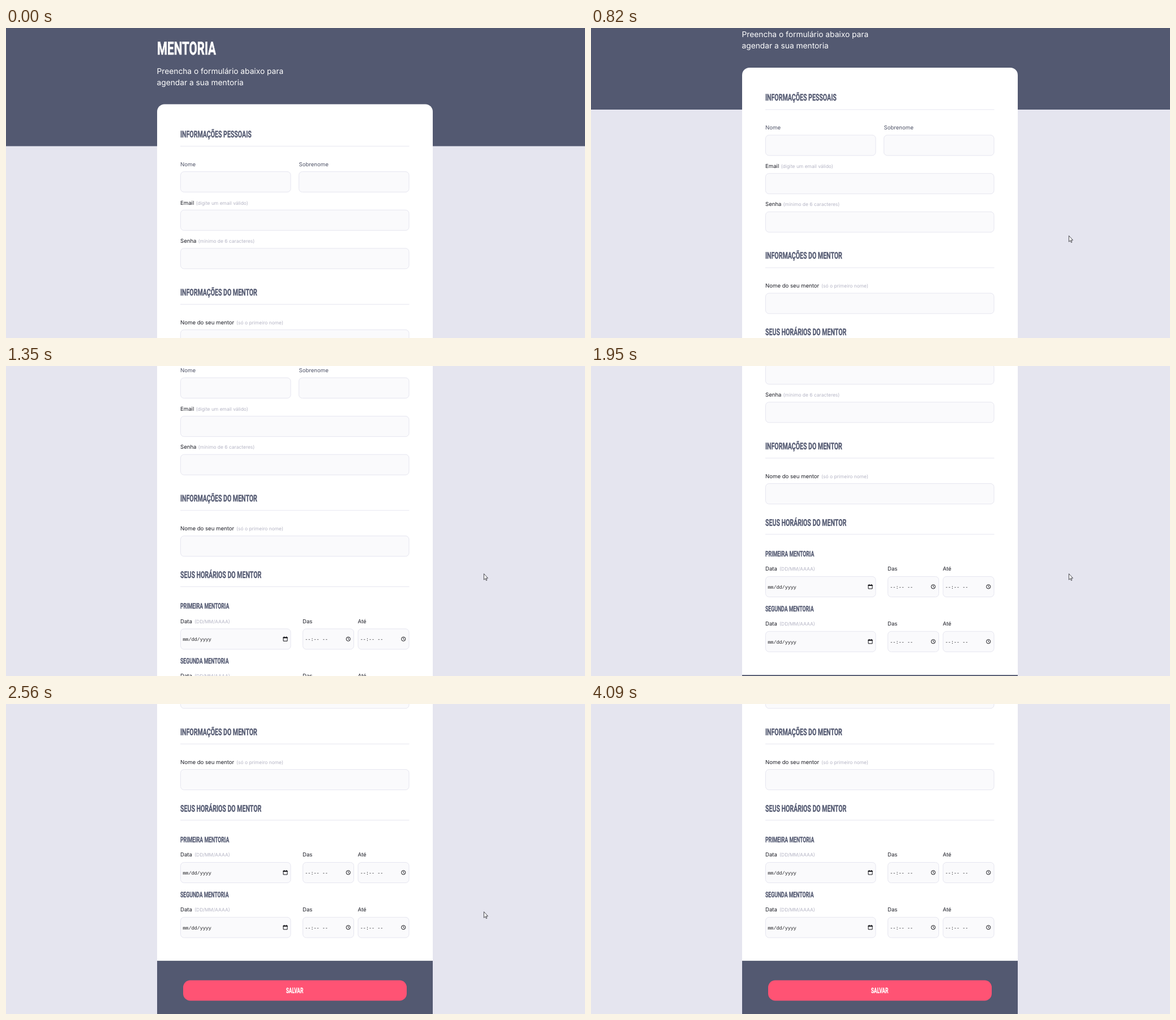
An HTML page for the animation above (4740 ms loop, 1023 by 547 pixels).

```html
<!DOCTYPE html>
<html lang="pt-BR">
<head>
<meta charset="utf-8">
<title>Mentoria</title>
<style>
  html, body { margin: 0; width: 100%; height: 100%; overflow: hidden; background: #e5e5ef; }
  svg { display: block; width: 100vw; height: 100vh; }
  text { font-family: Inter, "Open Sans", sans-serif; white-space: pre; text-rendering: geometricPrecision; }
  .head { font-family: Roboto, "Liberation Sans", sans-serif; font-weight: 700; }
  .mono { font-family: "Liberation Mono", "DejaVu Sans Mono", monospace; font-size: 8.45px; fill: #1b1b1f; }
  .label { font-size: 9.6px; fill: #1f2029; }
  .soft { fill: #4e5266; }
  .hint { font-size: 8.45px; fill: #b5b5c5; }
  .field { fill: #fafafc; stroke: #e6e6f0; stroke-width: 1; }
</style>
</head>
<body>
<svg id="stage" viewBox="0 0 1023 547" preserveAspectRatio="none">
  <rect width="1023" height="547" fill="#e5e5ef"/>
  <g id="page"></g>
  <path id="cursor" d="M.4 .6V11.2L2.8 8.9L4.4 12.5L5.8 11.9L4.3 8.3H7.4Z"
    fill="#fff" stroke="#1c1c22" stroke-width=".8" stroke-linejoin="round"/>
</svg>
<script>
const LOOP = 4740;
const SLATE = '#535971';
const PINK = '#ff5374';
const PINK_HOVER = '#ed4666';
const CONDENSE = 0.645;
const NS = 'http://www.w3.org/2000/svg';
const page = document.getElementById('page');
const cursor = document.getElementById('cursor');

function add(tag, attrs, content) {
  const el = document.createElementNS(NS, tag);
  for (const key in attrs) el.setAttribute(key, attrs[key]);
  if (content) el.textContent = content;
  page.appendChild(el);
  return el;
}

function rect(x, y, width, height, fill, rx = 0) {
  return add('rect', { x, y, width, height, fill, rx });
}

// Condensed display face shared by every heading
function heading(x, y, size, content, fill = SLATE, anchor = 'start') {
  add('text', {
    class: 'head', 'font-size': size, fill, stroke: fill,
    'stroke-width': size * 0.02, 'text-anchor': anchor,
    transform: `translate(${x} ${y}) scale(${CONDENSE} 1)`
  }, content);
}

function section(y, title) {
  heading(308, y, 16.4, title);
  rect(308, y + 15, 404.5, 1, '#e6e6f0');
}

function label(x, y, content, soft) {
  add('text', { x, y, class: soft ? 'label soft' : 'label' }, content);
}

function hint(x, y, content) {
  add('text', { x, y, class: 'hint' }, content);
}

function field(x, y, width) {
  add('rect', { x: x + 0.5, y: y + 0.5, width: width - 1, height: 36, rx: 6, class: 'field' });
}

function calendar(x, y) {
  add('path', {
    d: `M${x + 0.5} ${y + 1.5}h7v6.5h-7zM${x + 2} ${y}v1.5M${x + 6} ${y}v1.5`,
    fill: 'none', stroke: '#15151a', 'stroke-width': 1
  });
  rect(x, y + 1, 8, 2, '#15151a');
}

function clock(x, y) {
  add('circle', { cx: x, cy: y, r: 3.6, fill: 'none', stroke: '#15151a', 'stroke-width': 1 });
  add('path', { d: `M${x} ${y - 2.3}V${y + 0.2}L${x + 1.7} ${y + 1.2}`, fill: 'none', stroke: '#15151a', 'stroke-width': 0.9 });
}

function timeField(x, y, title) {
  label(x, y - 9.7, title);
  field(x, y, 91);
  add('text', { x: x + 4.3, y: y + 21.7, class: 'mono' }, '--:-- --');
  clock(x + 80.7, y + 18.4);
}

function schedule(y, title) {
  heading(308, y, 13.5, title);
  const top = y + 35;
  label(308, top - 9.7, 'Data');
  hint(333, top - 9.7, '(DD/MM/AAAA)');
  field(308, top, 195.5);
  add('text', { x: 312.3, y: top + 21.7, class: 'mono' }, 'mm/dd/yyyy');
  calendar(489.5, top + 14);
  timeField(524, top, 'Das');
  timeField(621.5, top, 'Até');
}

// Header and card
rect(0, 0, 1023, 208.5, SLATE);
heading(267, 47, 32, 'MENTORIA', '#fff');
for (const [y, line] of [[81, 'Preencha o formulário abaixo para'], [100.7, 'agendar a sua mentoria']]) {
  add('text', { x: 266.5, y, 'font-size': 13.75, fill: '#fff' }, line);
}
rect(267, 134.5, 487, 780, '#fff', 13);

// Personal details
section(193, 'INFORMAÇÕES PESSOAIS');
label(308, 243.8, 'Nome', true);
label(517.5, 243.8, 'Sobrenome', true);
field(308, 253, 195.5);
field(517, 253, 195.5);
label(308, 311.5, 'Email');
hint(335.5, 311.5, '(digite um email válido)');
field(308, 320.7, 404.5);
label(308, 379, 'Senha');
hint(339.5, 379, '(mínimo de 6 caracteres)');
field(308, 388.3, 404.5);

// Mentor details
section(472, 'INFORMAÇÕES DO MENTOR');
label(308, 522.5, 'Nome do seu mentor');
hint(407, 522.5, '(só o primeiro nome)');
field(308, 532, 404.5);
section(606.5, 'SEUS HORÁRIOS DO MENTOR');
schedule(661, 'PRIMEIRA MENTORIA');
schedule(757.8, 'SEGUNDA MENTORIA');

// Footer
rect(267, 870.1, 487, 130, SLATE);
const button = rect(313, 904.5, 395, 36, PINK, 12.5);
heading(510, 926.7, 13, 'SALVAR', '#fff', 'middle');

const clamp = v => Math.min(1, Math.max(0, v));
const mix = (a, b, p) => a + (b - a) * p;
const easeIn = p => p * p;
const easeOut = p => 1 - (1 - p) * (1 - p);
const easeOutCubic = p => 1 - (1 - p) ** 3;
const linear = p => p;

// Wheel notches: start, duration, distance
const NOTCH = 81.25;
const notches = [
  [650, 290, NOTCH], [910, 290, NOTCH], [1160, 290, NOTCH],
  [1694, 245, NOTCH], [2030, 180, NOTCH], [2300, 240, 10.75]
];

// Pointer moves: start, end, from, to, easing for x and y
const moves = [
  [118, 608, [937, 512], [844, 366], easeOutCubic, easeOut],
  [2750, 3278, [844, 366], [694, 479], easeIn, easeIn],
  [3278, 3479, [694, 479], [645, 503], easeOut, easeOut],
  [3820, 4014, [645, 503], [836, 530], linear, linear]
];

// The picture refreshes at about 15 frames per second
function snap(t) {
  const step = t < 608 ? 70 : 66.8;
  return 608 + Math.floor((t - 608) / step) * step;
}

function scrollAt(t) {
  return notches.reduce((sum, [start, time, dist]) => sum + dist * easeOut(clamp((t - start) / time)), 0);
}

function pointerAt(t) {
  let move = moves[0];
  for (const m of moves) if (t >= m[0]) move = m;
  const [start, end, from, to, ex, ey] = move;
  const p = clamp((t - start) / (end - start));
  return [mix(from[0], to[0], ex(p)), mix(from[1], to[1], ey(p))];
}

function draw(time) {
  const t = snap(time % LOOP);
  const scroll = scrollAt(t);
  const [x, y] = pointerAt(t);
  const visible = t >= 117 && t < 4080;
  const top = 904.5 - scroll;
  const hover = visible && x >= 313 && x <= 708 && y >= top && y <= top + 36;
  page.setAttribute('transform', `translate(0 ${-scroll})`);
  cursor.setAttribute('transform', `translate(${x} ${y})`);
  cursor.setAttribute('visibility', visible ? 'visible' : 'hidden');
  button.setAttribute('fill', hover ? PINK_HOVER : PINK);
}

function tick() {
  draw(performance.now());
  requestAnimationFrame(tick);
}
tick();
</script>
</body>
</html>
```
